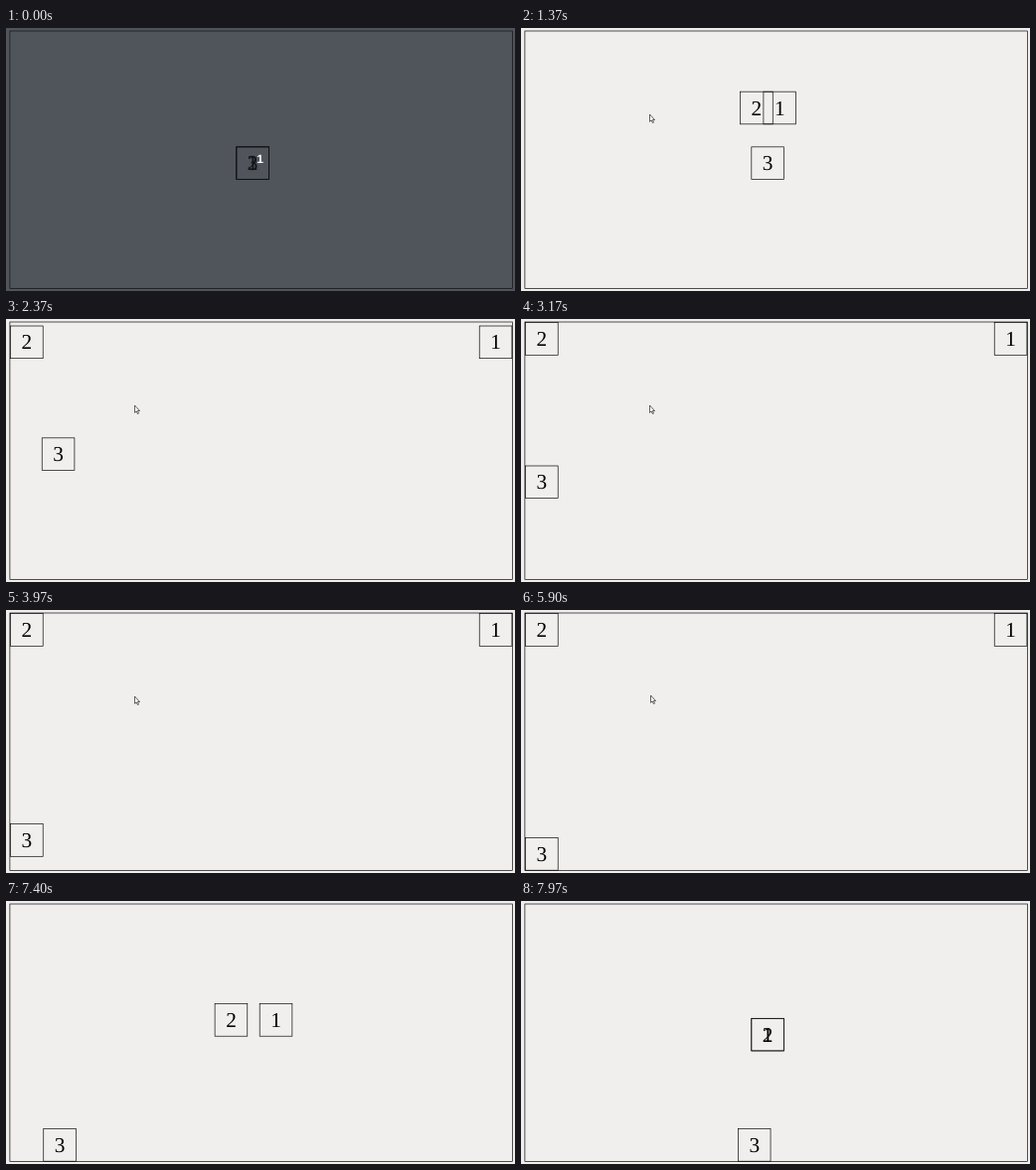
Recreate the animation shown at these times as an HTML page. Size 512 by 265 pixels, loop 8 s.

```html
<!DOCTYPE html>
<html lang="en">
<head>
<meta charset="utf-8">
<title>Staggered boxes</title>
<style>
  html, body { margin: 0; width: 100%; height: 100%; overflow: hidden; background: #f0efed; }
  svg { display: block; width: 512px; height: 265px; background: #f0efed; }
  rect { fill: none; stroke: #000; stroke-width: .67; }
  text {
    font: 21.3px "Liberation Serif", serif; text-anchor: middle; fill: #000;
    text-rendering: geometricPrecision;
  }
  #countdown { font: bold 12px "Liberation Sans", sans-serif; fill: #fff; }
  #cursor { fill: #fff; stroke: #222; stroke-width: .7; }
  .dimmed { background: #50545b; }
  .dimmed rect { stroke: #0c0e10; }
  .dimmed text { fill: #141618; }
</style>
</head>
<body>
<svg id="stage" viewBox="0 0 512 265">
  <rect x="3.9" y="3" width="505.6" height="259.6"/>
  <g id="box1"><rect x=".33" y=".33" width="32.67" height="32.67"/><text x="16.7" y="23.8">1</text></g>
  <g id="box2"><rect x=".33" y=".33" width="32.67" height="32.67"/><text x="16.7" y="23.8">2</text></g>
  <g id="box3"><rect x=".33" y=".33" width="32.67" height="32.67"/><text x="16.7" y="23.8">3</text></g>
  <path id="cursor" d="M0 0V7.4L1.7 5.9L2.9 8.6L4 8.1L2.9 5.5H5Z"/>
  <text id="countdown" x="255.5" y="136">1</text>
</svg>
<script>
const LOOP = 8000;
const DIM_END = 270;
const ENTER = 805, LEAVE = 6271;   // pointer enters and leaves the frame
const SECOND = 1000;
const CENTER = { x: 231.5, y: 119.5 };

// delay and duration of each axis, in seconds
const boxes = [
  { id: 'box1', to: { x: 475.9, y: 3.3 }, x: [0.5, 1], y: [0, 2] },
  { id: 'box2', to: { x: 4.2, y: 3.3 }, x: [0.5, 1], y: [0, 2] },
  { id: 'box3', to: { x: 4.2, y: 229.2 }, x: [1, 1], y: [2, 2] },
];

const byId = id => document.getElementById(id);
const place = (id, x, y) => byId(id).setAttribute('transform', `translate(${x} ${y})`);
const show = (id, visible) => byId(id).setAttribute('visibility', visible ? 'visible' : 'hidden');

// cubic-bezier(.25, .1, .25, 1)
function ease(t) {
  if (t <= 0) return 0;
  if (t >= 1) return 1;
  const curve = (s, a, b) => 3 * s * (1 - s) ** 2 * a + 3 * s * s * (1 - s) * b + s ** 3;
  let low = 0, high = 1;
  for (let i = 0; i < 24; i++) {
    const mid = (low + high) / 2;
    if (curve(mid, 0.25, 0.25) < t) low = mid; else high = mid;
  }
  return curve(low, 0.1, 1);
}

function axisPosition(box, axis, time) {
  const [delay, duration] = box[axis];
  const progress = start => ease(((time - start) / SECOND - delay) / duration);
  const amount = progress(ENTER) - progress(LEAVE);
  return CENTER[axis] + (box.to[axis] - CENTER[axis]) * amount;
}

function draw(time) {
  const dimmed = time < DIM_END;
  byId('stage').classList.toggle('dimmed', dimmed);
  show('countdown', dimmed);
  for (const box of boxes) {
    place(box.id, axisPosition(box, 'x', time), axisPosition(box, 'y', time));
  }
  show('cursor', time >= 830 && time < LEAVE);
  if (time < 5900) place('cursor', 129.5, 87);
  else place('cursor', 130.5, 86);
}

const startTime = performance.now();
function tick() {
  draw((performance.now() - startTime) % LOOP);
  requestAnimationFrame(tick);
}
tick();
</script>
</body>
</html>
```
